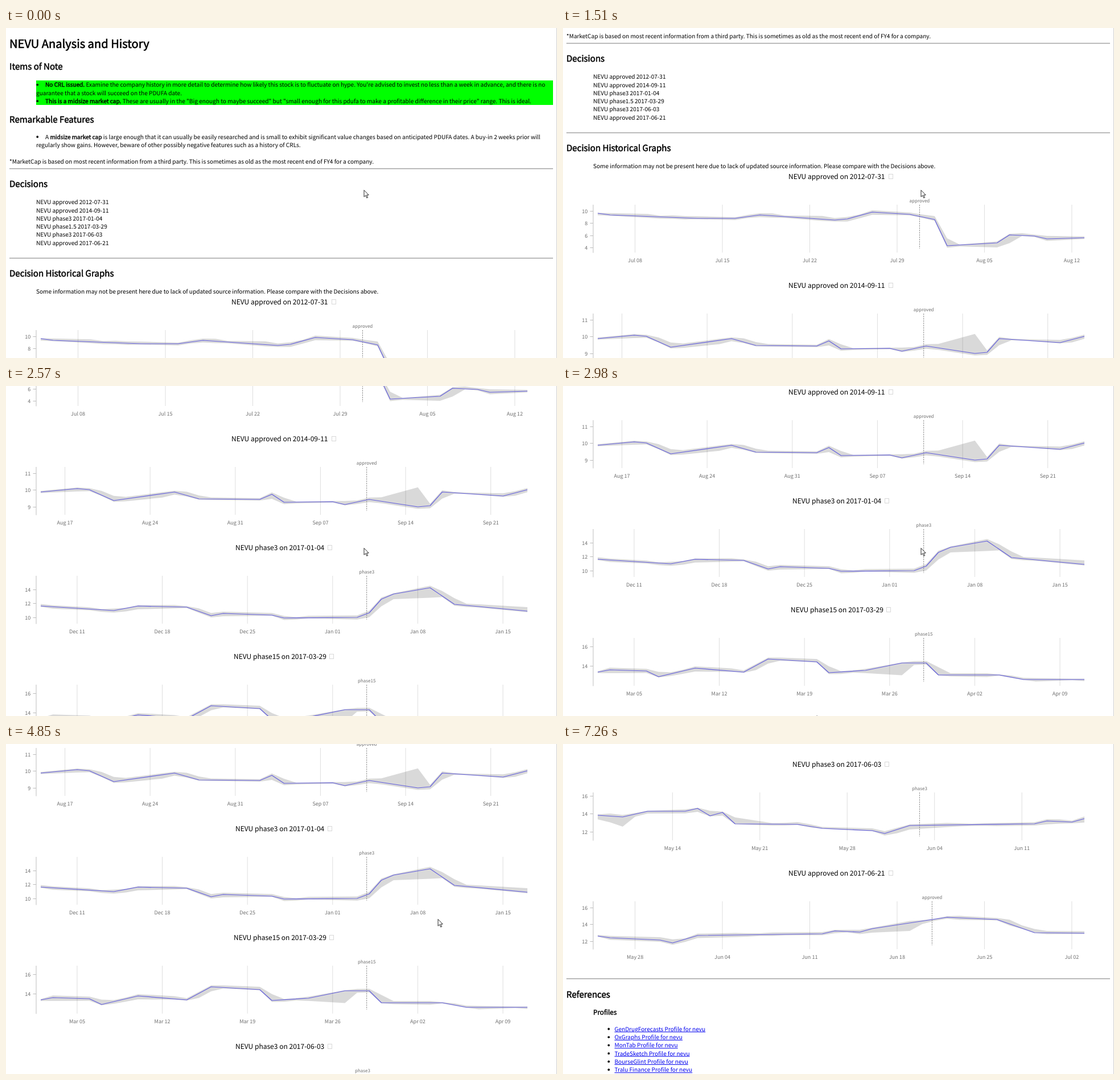
These frames come from a looping animation (968x579 px, 7.67 s). An HTML page:

```html
<!DOCTYPE html>
<html lang="en">
<head>
<meta charset="utf-8">
<title>NEVU Analysis and History</title>
<style>
html, body { margin: 0; width: 100%; height: 100%; overflow: hidden; background: #fff; }
svg { display: block; width: 968px; height: 579px; }
text {
  font: 10.095px "Noto Sans CJK SC", "Noto Sans CJK JP", "Noto Sans CJK KR", "Noto Sans CJK TC", "Noto Sans CJK", "Noto Sans", sans-serif;
  text-rendering: geometricPrecision;
}
.bold { stroke: #000; stroke-width: .42px; }
text.h1 { font-size: 20.12px; stroke: #000; stroke-width: .6px; }
text.h2 { font-size: 15.08px; stroke: #000; stroke-width: .5px; }
text.h3 { font-size: 11.75px; stroke: #000; stroke-width: .42px; }
text.title { font-size: 12.04px; }
text.tick { font-size: 9.05px; fill: #707070; }
text.note { font-size: 8px; fill: #707070; text-anchor: middle; }
.mid { text-anchor: middle; }
.end { text-anchor: end; }
.link { fill: #00e; text-decoration: underline; }
.grid { stroke: #dedede; }
.axis { stroke: #bdbdbd; }
.mark { stroke: #8a8a8a; stroke-dasharray: 2.5 1.5; }
.band { fill: #000; fill-opacity: .15; }
.line { fill: none; stroke: #6460dc; stroke-width: 1.2; stroke-linejoin: round; }
.tofu { fill: none; stroke: #d8d8d8; }
</style>
</head>
<body>
<svg viewBox="0 0 968 579">
  <g id="page"></g>
  <path d="M967.5 0V579" stroke="#d0d0d0"/>
  <path id="cursor" d="M0 .5V12.3L2.7 9.7 4.7 14.2 6.6 13.4 4.6 9H8.3Z" fill="#fff" stroke="#111" stroke-width=".9"/>
</svg>
<script>
const LOOP = 7670, ROW = 14.3, DAY = 864e5;
const LEFT = 61, RIGHT = 916;
const page = document.getElementById('page');
const cursor = document.getElementById('cursor');
const parts = [];

const add = s => parts.push(s);
const text = (x, y, s, cls = '') => add(`<text x="${x}" y="${y}" class="${cls}">${s}</text>`);
const path = (d, cls) => add(`<path d="${d}" class="${cls}"/>`);
const bold = s => `<tspan class="bold">${s}</tspan>`;
const dot = (x, y) => add(`<circle cx="${x}" cy="${y}" r="1.9"/>`);
const rows = (x, y, list, cls) => list.forEach((s, i) => text(x, y + i * ROW, s, cls));
function rule(y) {
  add(`<rect x="6" y="${y}" width="955" height="1" fill="#a9a9a9"/>`);
  add(`<rect x="6" y="${y + 1}" width="955" height="1" fill="#cfcfcf"/>`);
}

// Linear path through [x, y] key points
function lerp(keys, x) {
  let i = keys.length - 2;
  while (i > 0 && keys[i][0] > x) i--;
  const [x0, y0] = keys[i], [x1, y1] = keys[i + 1];
  return y0 + (y1 - y0) * (x - x0) / (x1 - x0);
}

let seed = 7;
const random = () => (seed = seed * 16807 % 2147483647) / 2147483647;

// Intro
text(6, 35.4, 'NEVU Analysis and History', 'h1');
text(6, 73, 'Items of Note', 'h2');
add('<rect x="53" y="92" width="908" height="43" fill="#0f0"/>');
dot(55.2, 99.6);
text(69, 103.3, bold('No CRL issued.') + ' Examine the company history in more detail to determine how likely this stock is to fluctuate on hype. You\'re advised to invest no less than a week in advance, and there is no');
text(53, 117.6, 'guarantee that a stock will succeed on the PDUFA date.');
dot(55.2, 128.2);
text(69, 131.9, bold('This is a midsize market cap.') + ' These are usually in the "Big enough to maybe succeed" but "small enough for this pdufa to make a profitable difference in their price" range. This is ideal.');
text(6, 165.5, 'Remarkable Features', 'h2');
dot(55.2, 191);
text(69, 194.7, 'A ' + bold('midsize market cap') + ' is large enough that it can usually be easily researched and is small to exhibit significant value changes based on anticipated PDUFA dates. A buy-in 2 weeks prior will');
text(53, 209, 'regularly show gains. However, beware of other possibly negative features such as a history of CRLs.');
text(6, 237.6, '*MarketCap is based on most recent information from a third party. This is sometimes as old as the most recent end of FY4 for a company.');
rule(246);
text(6, 279, 'Decisions', 'h2');
rows(53, 309.2, ['approved 2012-07-31', 'approved 2014-09-11', 'phase3 2017-01-04',
  'phase1.5 2017-03-29', 'phase3 2017-06-03', 'approved 2017-06-21'].map(s => 'NEVU ' + s));
rule(403);
text(6, 435.5, 'Decision Historical Graphs', 'h2');
text(53, 465.6, 'Some information may not be present here due to lack of updated source information. Please compare with the Decisions above.');

// Charts: keys are [day, pixels below the title]; scale is [top label, step, count, first y, gap]
const holidays = ['2014-09-01', '2016-12-26', '2017-01-02', '2017-01-16', '2017-05-29'];
const titleX = { approved: 396, phase3: 403, phase15: 400 };
let chartY = 481;

function tradingDays(start, span) {
  const days = [];
  for (let d = 0; d <= span; d++) {
    const when = new Date(start + d * DAY), wd = when.getUTCDay();
    if (wd % 6 && !holidays.includes(when.toISOString().slice(0, 10))) days.push(d);
  }
  return days;
}

// Each day's range reaches part of the way back to the day before
function range(days, keys, [peak, size]) {
  return days.map((d, i) => {
    const now = lerp(keys, d), before = lerp(keys, days[Math.max(0, i - 1)]);
    const gap = Math.max(-10, Math.min(10, (before - now) / 2));
    const swell = d > peak || d < peak - 5 ? 0 : size * (1 - (peak - d) / 5) ** 2;
    return {
      hi: now + Math.min(0, gap) - .8 - random() * 3 - Math.max(0, swell),
      lo: now + Math.max(0, gap) + .8 + random() * 3 + Math.max(0, -swell)
    };
  });
}

function chart(event, date, from, span, [top, step, count, y0, dy], bulge, keys) {
  const y = chartY, start = Date.parse(from);
  const px = d => LEFT + (RIGHT - LEFT) * d / span;
  const pt = (d, v) => `${px(d).toFixed(1)} ${(y + v).toFixed(1)}`;
  chartY += 191;

  const tx = titleX[event];
  text(tx, y + 4.4, `NEVU ${event} on ${date}`, 'title');
  add(`<rect x="${968.5 - tx}" y="${y - 4.5}" width="7" height="8" class="tofu"/>`);
  const firstSunday = (7 - new Date(start).getUTCDay()) % 7;
  for (let d = firstSunday; d <= span; d += 7) {
    const x = px(d) - .2;
    path(`M${x} ${y + 49}V${y + 133}`, 'grid');
    const label = new Date(start + d * DAY).toLocaleDateString('en-US', { month: 'short', day: '2-digit', timeZone: 'UTC' });
    text(x, y + 149.6, label, 'tick mid');
  }
  path(`M53 ${y + 49}V${y + 133.5}`, 'axis');
  for (let i = 0; i < count; i++) {
    const ty = y + y0 + i * dy;
    path(`M47.5 ${Math.floor(ty) + .5}H53`, 'axis');
    text(43.3, ty + 3.5, top - i * step, 'tick end');
  }

  const days = tradingDays(start, span), band = range(days, keys, bulge);
  const upper = days.map((d, i) => pt(d, band[i].hi));
  const lower = days.map((d, i) => pt(d, band[i].lo)).reverse();
  path(`M${upper.join('L')}L${lower.join('L')}Z`, 'band');
  const mark = px((Date.parse(date) - start) / DAY - 5 / 24);
  path(`M${mark} ${y + 49}V${y + 126}`, 'mark');
  text(mark, y + 45.3, event, 'note');
  path('M' + keys.map(([d, v]) => pt(d, v)).join('L'), 'line');
}

chart('approved', '2012-07-31', '2012-07-05', 39, [10, 2, 4, 60, 21.5], [33, -6],
  [[0, 64], [1, 67], [8, 73], [11, 73], [13, 67], [19, 76], [20, 74], [22, 62], [25, 66], [27, 75],
   [28, 121], [32, 116], [33, 102], [35, 104], [36, 109], [39, 107]]);
chart('approved', '2014-09-11', '2014-08-15', 40, [11, 1, 3, 60, 29.5], [31, 26],
  [[0, 93], [3, 87], [4, 89], [6, 108], [11, 93], [13, 105], [18, 106], [19, 97], [20, 111], [24, 110],
   [25, 115], [27, 106], [31, 119], [32, 117], [33, 93], [38, 100], [40, 89]]);
chart('phase3', '2017-01-04', '2016-12-08', 40, [14, 2, 3, 73, 24.5], [32, -10],
  [[0, 102], [6, 110], [8, 102], [12, 104], [14, 119], [15, 115], [19, 118], [20, 123], [26, 122],
   [27, 114], [28, 90], [29, 81], [32, 70], [34, 99], [40, 111]]);
chart('phase15', '2017-03-29', '2017-03-02', 40, [16, 2, 2, 64, 34], [25, -12],
  [[0, 109], [1, 105], [4, 107], [5, 117], [8, 102], [12, 109], [14, 86], [18, 91], [19, 110], [22, 106],
   [25, 93], [27, 93], [28, 114], [33, 114], [35, 122], [40, 122]]);
chart('phase3', '2017-06-03', '2017-05-08', 39, [16, 2, 3, 55, 31.8], [2, -14],
  [[0, 89], [2, 92], [4, 82], [7, 82], [8, 77], [9, 90], [10, 84], [11, 104], [16, 105], [18, 112],
   [22, 116], [23, 121], [25, 107], [35, 104], [36, 99], [38, 101], [39, 95]]);
chart('approved', '2017-06-21', '2017-05-25', 39, [16, 2, 3, 60, 29.6], [25, -8],
  [[0, 110], [1, 113], [5, 117], [6, 122], [8, 109], [18, 106], [19, 101], [21, 103], [22, 97],
   [28, 77], [32, 81], [35, 104], [39, 105]]);

// References
rule(1620);
text(6, 1653.5, 'References', 'h2');
text(53, 1684.2, 'Profiles', 'h3');
const sites = ['GenDrugForecasts', 'OxGraphs', 'MonTab', 'TradeSketch', 'BourseGlint', 'Tralu Finance'];
rows(90.5, 1712.7, sites.map(s => s + ' Profile for nevu'), 'link');
sites.forEach((s, i) => dot(80.3, 1709 + i * ROW));

page.innerHTML = parts.join('');

// Moves: time, number of even steps to the next one, values
const scroll = [
  [0, 1, 0], [620, 8, 24], [1510, 5, 220], [2080, 4, 397], [2570, 4, 579],
  [2980, 1, 661], [3090, 1, 665], [4850, 8, 714], [5720, 1, 1209]
];
const pointer = [
  [0, 1, 629, 284], [3090, 6, 629, 284], [3780, 5, 613, 235], [4370, 2, 903, 180],
  [4610, 1, 759, 307], [6320, 3, 759, 307], [6640, 5, 646, 254], [7150, 1, 902, 563]
];

function sample(moves, t) {
  let i = moves.length - 1;
  while (moves[i][0] > t) i--;
  const [from, n, ...a] = moves[i], next = moves[i + 1];
  if (!next) return a;
  const k = Math.min(n - 1, Math.floor((t - from + .5) / (next[0] - from) * n)) / n;
  return a.map((v, j) => v + (next[j + 2] - v) * k);
}

function draw(t) {
  const [s] = sample(scroll, t), [x, y] = sample(pointer, t);
  page.setAttribute('transform', `translate(0 ${-Math.round(s)})`);
  cursor.setAttribute('transform', `translate(${Math.round(x)} ${Math.round(y)})`);
  cursor.setAttribute('visibility', t < 7260 ? 'visible' : 'hidden');
}

const begin = performance.now();
function tick() {
  draw((performance.now() - begin) % LOOP);
  requestAnimationFrame(tick);
}
tick();
</script>
</body>
</html>
```
